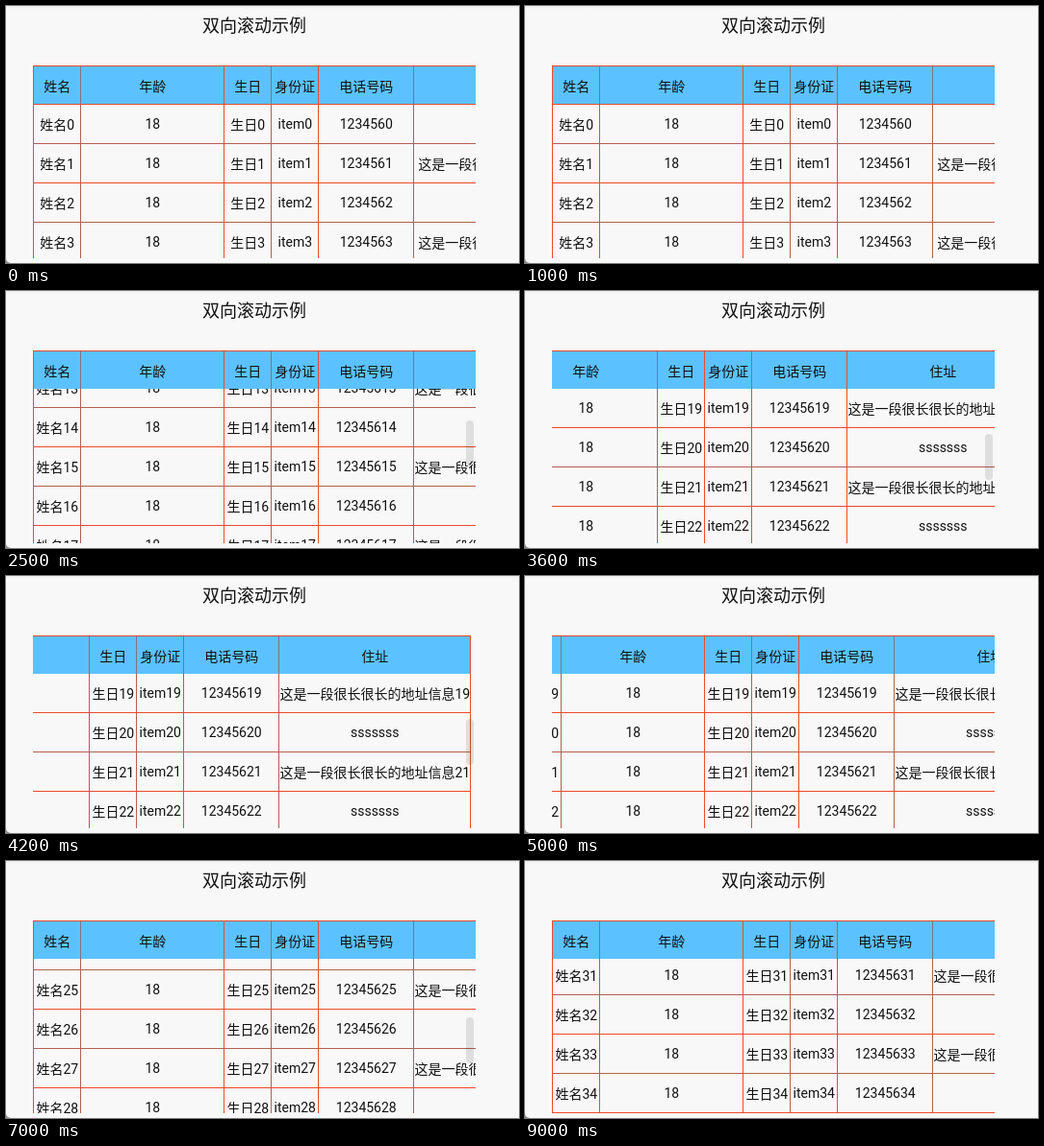
An HTML page with a canvas that plays this animation: 533x268 px, repeating every 9200 ms.

```html
<!DOCTYPE html>
<html lang="zh-CN">
<head>
<meta charset="utf-8">
<title>双向滚动示例</title>
<style>
  html, body { margin: 0; width: 100%; height: 100%; overflow: hidden; background: #8c8c8c; }
  canvas { display: block; }
</style>
</head>
<body>
<canvas id="stage" width="533" height="268"></canvas>
<script>
const ctx = document.getElementById('stage').getContext('2d');
const LOOP = 9200, STEP = 100;
const FONT = "Roboto, 'Noto Sans CJK SC', 'Noto Sans CJK', sans-serif";
const VIEW = { left: 28, top: 62, body: 102, right: 488, bottom: 263 };
const ROW = 41, LAST_ROW = 34;
const RED = '#ee4a2b', DULL = '#b26050', DULL_ON_BLUE = '#7f7485';

const columns = [
  { title: '姓名', width: 49, text: i => '姓名' + i },
  { title: '年龄', width: 149, text: () => '18' },
  { title: '生日', width: 49, text: i => '生日' + i },
  { title: '身份证', width: 49, text: i => 'item' + i },
  { title: '电话号码', width: 99, text: i => '123456' + i },
  { title: '住址', width: 199, text: i => i % 2 ? '这是一段很长很长的地址信息' + i : 'sssssss' },
];
const tableWidth = columns.reduce((sum, c) => {
  c.left = sum;
  return sum + c.width;
}, 0);

// Each flick of the finger slows down towards its resting offset.
const flicks = [
  { axis: 'y', start: 1400, duration: 400, to: 138 },
  { axis: 'y', start: 1900, duration: 300, to: 329 },
  { axis: 'y', start: 2300, duration: 300, to: 555 },
  { axis: 'y', start: 2700, duration: 200, to: 780 },
  { axis: 'x', start: 3500, duration: 700, to: 140 },
  { axis: 'x', start: 4800, duration: 880, to: 0 },
  { axis: 'y', start: 6700, duration: 400, to: 1014 },
  { axis: 'y', start: 7300, duration: 200, to: 1275 },
];
const thumbShown = [[400, 1000], [1400, 4800], [6700, 9000]];

const easeOut = p => 1 - (1 - p) ** 3;

// The picture is refreshed once per STEP, so motion is sampled at the end of it.
function scrollAt(time) {
  const now = (Math.floor(time / STEP) + 1) * STEP;
  const offset = { x: 0, y: 0 };
  for (const { axis, start, duration, to } of flicks) {
    const progress = Math.min(1, Math.max(0, (now - start) / duration));
    offset[axis] += (to - offset[axis]) * easeOut(progress);
  }
  return { x: Math.round(offset.x), y: Math.round(offset.y) };
}

function rect(color, x, y, w, h) {
  ctx.fillStyle = color;
  ctx.fillRect(x, y, w, h);
}

function label(text, x, baseline, size = 14) {
  ctx.font = `${size}px ${FONT}`;
  ctx.textAlign = 'center';
  ctx.fillStyle = '#111';
  ctx.fillText(text, x, baseline);
}

// One-pixel lines are pure red only on even coordinates.
const lineColor = (pos, dull) => pos % 2 ? dull : RED;

function horizontalLine(x, y) {
  rect(lineColor(y, DULL), x, y, tableWidth + 1, 1);
}

function verticalLines(x, top, bottom, dull) {
  for (const left of [...columns.map(c => c.left), tableWidth]) {
    rect(lineColor(x + left, dull), x + left, top, 1, bottom - top);
  }
}

function clipped(top, bottom, paint) {
  ctx.save();
  ctx.beginPath();
  ctx.rect(VIEW.left, top, VIEW.right - VIEW.left, bottom - top);
  ctx.clip();
  paint();
  ctx.restore();
}

const centre = (x, c) => x + c.left + (c.width + 1.5) / 2;

function drawWindow() {
  ctx.clearRect(0, 0, 533, 268);
  ctx.fillStyle = '#f8f8f8';
  ctx.beginPath();
  ctx.roundRect(0, 0, 533, 268, [0, 0, 0, 5]);
  ctx.fill();
  const shade = ctx.createLinearGradient(0, 0, 0, 3);
  shade.addColorStop(0, '#eeeeee');
  shade.addColorStop(1, '#f8f8f8');
  rect(shade, 0, 0, 533, 3);
  label('双向滚动示例', 258, 27, 18);
}

function drawHeader(x) {
  rect('#5bc2ff', x, VIEW.top, tableWidth + 1, VIEW.body - VIEW.top);
  verticalLines(x, VIEW.top, VIEW.body, DULL_ON_BLUE);
  horizontalLine(x, VIEW.top);
  for (const c of columns) label(c.title, centre(x, c), 89);
}

function drawBody(x, y) {
  verticalLines(x, VIEW.body, VIEW.bottom, DULL);
  const first = Math.floor(y / ROW);
  for (let i = first; i <= Math.min(first + 4, LAST_ROW); i++) {
    const top = VIEW.body + i * ROW - y;
    horizontalLine(x, top);
    horizontalLine(x, top + ROW);
    for (const c of columns) {
      const text = c.text(i);
      const baseline = top + (/[^\x00-\x7f]/.test(text) ? 27 : 26);
      label(text, centre(x, c), baseline);
    }
  }
}

function drawThumb(y) {
  ctx.fillStyle = 'rgba(0, 0, 0, 0.1)';
  ctx.beginPath();
  ctx.roundRect(478, VIEW.body + Math.round(y * 0.0602), 8, 48, 4);
  ctx.fill();
}

function draw(time) {
  const scroll = scrollAt(time);
  const x = VIEW.left - scroll.x;
  drawWindow();
  clipped(VIEW.top, VIEW.body, () => drawHeader(x));
  clipped(VIEW.body, VIEW.bottom, () => drawBody(x, scroll.y));
  if (thumbShown.some(([from, to]) => time >= from && time < to)) drawThumb(scroll.y);
}

const start = performance.now();
function tick() {
  draw((performance.now() - start) % LOOP);
  requestAnimationFrame(tick);
}
tick();
</script>
</body>
</html>
```
